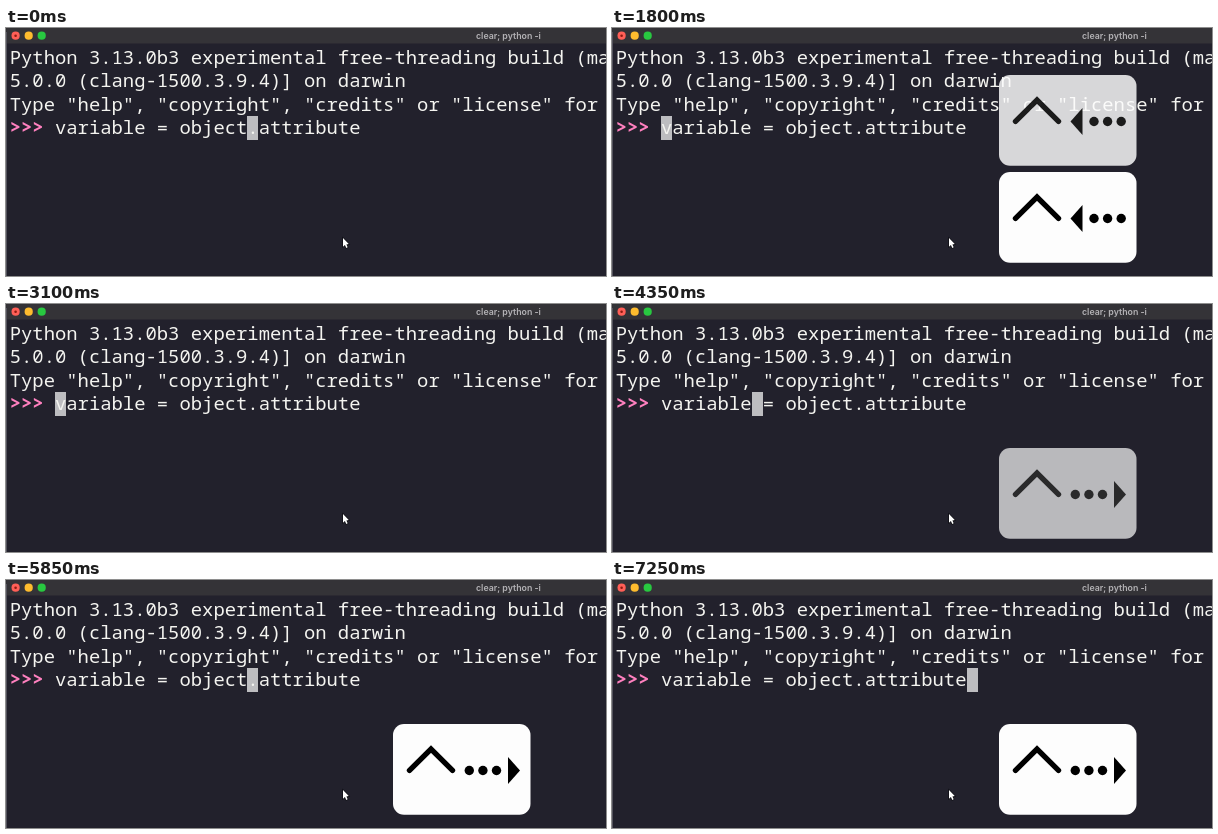
Recreate the animation shown at these times as an HTML page with a canvas. Size 600 by 248 pixels, loop 7300 ms.

```html
<!DOCTYPE html>
<html lang="en">
<head>
<meta charset="utf-8">
<title>Word-wise cursor movement in the REPL</title>
<style>
  html, body { margin: 0; width: 100%; height: 100%; overflow: hidden; background: #22212c; }
  canvas { display: block; width: 600px; height: 248px; }
</style>
</head>
<body>
<canvas id="stage" width="600" height="248"></canvas>
<script>
const ctx = document.getElementById('stage').getContext('2d');

const LOOP = 7300;
const HOLD = 1045;
const FADE = 490;

const CELL = 11.32;
const LEFT = 3.7;
const BASELINE = 36;
const LINE = 23.4;
const MONO = '18.87px "Noto Sans Mono", "DejaVu Sans Mono", monospace';

const BANNER = [
  'Python 3.13.0b3 experimental free-threading build (main',
  '5.0.0 (clang-1500.3.9.4)] on darwin',
  'Type "help", "copyright", "credits" or "license" for more'
];
const INPUT = 'variable = object.attribute';
const INPUT_X = LEFT + 4 * CELL;

// Cursor column within the input, from a given time on.
const cursorStops = [
  { at: 0, col: 17 }, { at: 800, col: 11 }, { at: 1500, col: 0 },
  { at: 3200, col: 8 }, { at: 4850, col: 17 }, { at: 6400, col: 27 }
];

const presses = [
  { at: 670, dir: -1 }, { at: 1450, dir: -1 },
  { at: 3155, dir: 1 }, { at: 4805, dir: 1 }, { at: 6350, dir: 1 }
];

function disc(x, y, r, color) {
  ctx.fillStyle = color;
  ctx.beginPath();
  ctx.arc(x, y, r, 0, Math.PI * 2);
  ctx.fill();
}

function polygon(points) {
  ctx.beginPath();
  points.forEach(([x, y]) => ctx.lineTo(x, y));
  ctx.closePath();
}

function drawWindow() {
  ctx.fillStyle = '#22212c';
  ctx.fillRect(0, 0, 600, 248);
  ctx.fillStyle = '#343337';
  ctx.fillRect(0, 0, 600, 15.5);
  ctx.fillStyle = '#55545e';
  ctx.fillRect(0, 4, 1, 244);

  disc(9.6, 7.7, 4.1, '#ff5f57');
  disc(9.6, 7.7, 1.3, '#8c1a10');
  disc(22.7, 7.7, 4.1, '#febc2e');
  disc(35.7, 7.7, 4.1, '#28c840');
  ctx.font = '600 8.8px Inter, Roboto, sans-serif';
  ctx.fillStyle = '#b4b3b6';
  ctx.fillText('clear; python -i', 470, 11);
}

function drawTerminal(t) {
  const { col } = cursorStops.filter(stop => stop.at <= t).pop();
  ctx.fillStyle = '#bdbdc0';
  ctx.fillRect(Math.round(INPUT_X + col * CELL), 88, 11, 24);

  const inputY = BASELINE + 3 * LINE;
  ctx.font = MONO;
  ctx.fillStyle = '#f4f4f0';
  BANNER.forEach((text, row) => ctx.fillText(text, LEFT, BASELINE + row * LINE));
  ctx.fillText(INPUT, INPUT_X, inputY);
  ctx.font = 'bold ' + MONO;
  ctx.fillStyle = '#ff80bf';
  ctx.fillText('>>>', LEFT, inputY);
}

function drawPointer() {
  ctx.save();
  ctx.translate(337, 210);
  ctx.scale(0.92, 0.92);
  polygon([[0, 0], [0, 9.4], [2.1, 7.6], [3.5, 10.8], [5.1, 10], [3.7, 7], [6.3, 6.6]]);
  ctx.lineWidth = 1.4;
  ctx.strokeStyle = '#0c0c10';
  ctx.stroke();
  ctx.fillStyle = '#fff';
  ctx.fill();
  ctx.restore();
}

function drawKey(dir, y, alpha) {
  ctx.save();
  ctx.translate(387, y);
  ctx.globalAlpha = alpha;
  ctx.fillStyle = '#fdfdfd';
  ctx.beginPath();
  ctx.roundRect(0, 0, 137.5, 90.7, 11);
  ctx.fill();

  // The symbol fades a little slower than its plate.
  ctx.globalAlpha = alpha ** 0.7;
  ctx.strokeStyle = ctx.fillStyle = '#000';
  ctx.lineWidth = 5.4;
  ctx.lineCap = 'round';
  ctx.beginPath();
  ctx.moveTo(16.5, 46.4);
  ctx.lineTo(38, 25);
  ctx.lineTo(59.5, 46.4);
  ctx.stroke();

  const tip = dir < 0 ? 71.5 : 127;
  const base = tip - dir * 12;
  polygon([[tip, 46.5], [base, 33], [base, 60]]);
  ctx.fill();
  for (let i = 0; i < 3; i++) disc(base - dir * (11.5 + 13.6 * i), 46.5, 4.7, '#000');
  ctx.restore();
}

function drawKeys(t) {
  presses.forEach(({ at, dir }, i) => {
    const age = t - at;
    if (age < 0 || age >= HOLD + FADE) return;
    const alpha = 1 - Math.max(0, age - HOLD) / FADE;
    const pushedUp = presses.some((later, j) => j > i && later.at <= t);
    drawKey(dir, pushedUp ? 47 : 144, alpha);
  });
}

function render(now) {
  const t = now % LOOP;
  drawWindow();
  drawTerminal(t);
  drawPointer();
  drawKeys(t);
}

let start;
function tick(now) {
  start ??= now;
  render(now - start);
  requestAnimationFrame(tick);
}
requestAnimationFrame(tick);
</script>
</body>
</html>
```
